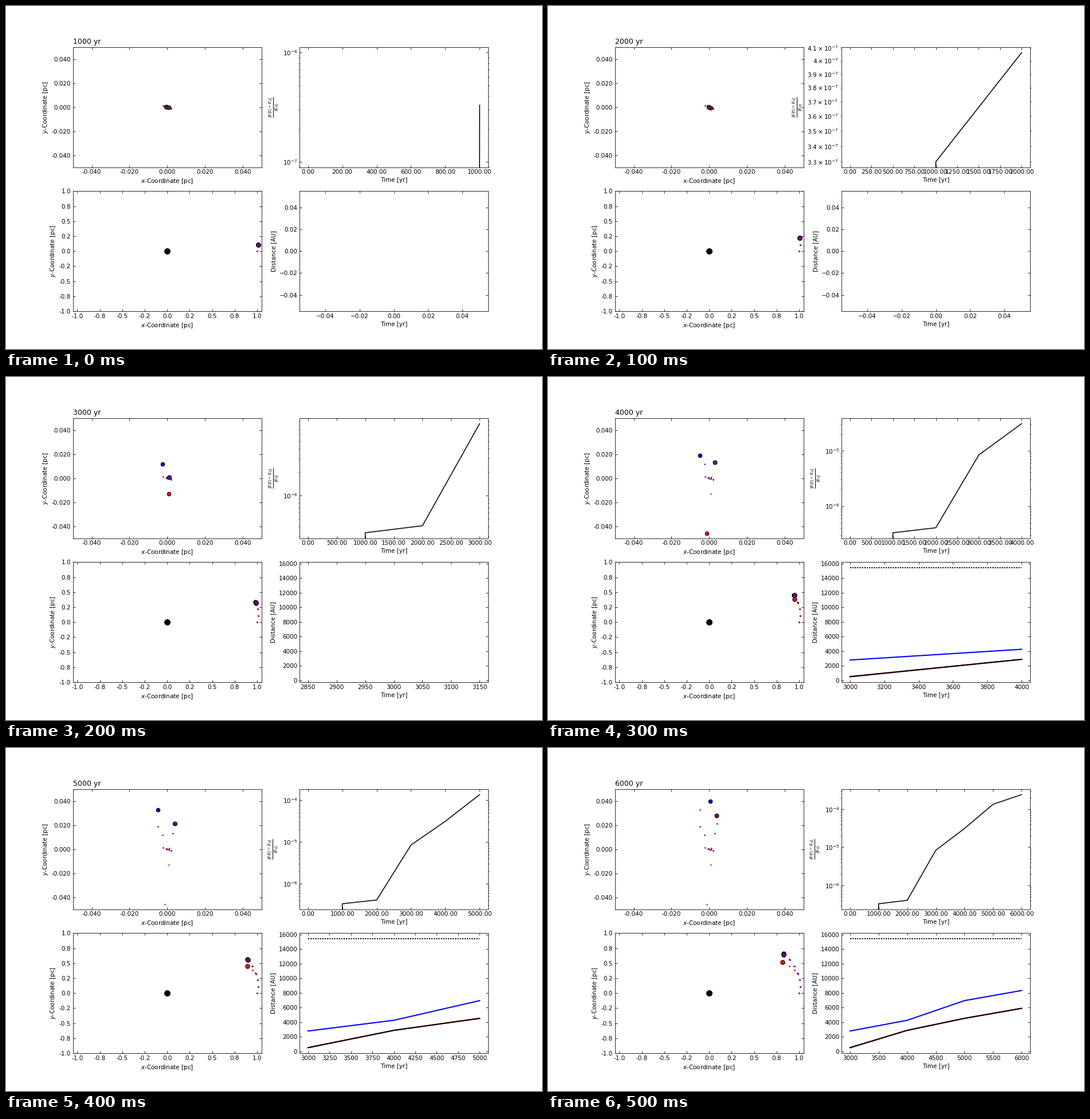
These frames come from a looping animation (935 by 599 pixels, 600 ms). A matplotlib script:

```python
import numpy as np
import matplotlib.pyplot as plt
from matplotlib.animation import FuncAnimation
from matplotlib.ticker import FormatStrFormatter

DPI = 74.8
STEP = 1000            # years per frame
BREAKUP = 3            # first snapshot after the cluster falls apart
AU_PER_PC = 206265
TIDAL_RADIUS = 15450   # AU

plt.rcParams.update({
    "font.family": "DejaVu Sans",
    "xtick.direction": "in", "ytick.direction": "in",
    "xtick.top": True, "ytick.right": True,
})

t = np.arange(7)
years = STEP * t


def path(x, y):
    return np.column_stack([x, y])


# Two bound binaries swing past each other; then one star is thrown down
# (red), one up (blue), and a tight pair (orange, purple) drifts away.
start = np.array([.0021, -.0013])
swing_blue = np.outer(np.cos(1.85 * t) * .5 ** t, start)
swing_pair = np.outer(-(-.25) ** t, start)

free = np.clip(t - BREAKUP + 1, 0, None)
far = np.clip(t - BREAKUP, 0, None)
escaped = free > 0
odd = t % 2

blue = swing_blue + path(-.00285 * free + .000047 * free ** 4,
                         .0104 * free - escaped * .0016 * np.cos(np.pi * t))
pair = swing_pair + path(escaped * .0009 + .0028 * far - .0006 * far ** 2,
                         escaped * .0006 + .0128 * far ** .7)
spin = path(.0002 * odd, 0 * t)
PARTICLES = {
    "red": -(blue + 2 * pair),
    "blue": blue,
    "orange": pair - spin,
    "purple": pair + spin,
}

# Path of the cluster around the central black hole.
angle = .1072 * t
radius = 1 + .042 * np.sin(np.pi * t / 8)
CENTRE = path(radius * np.cos(angle), radius * np.sin(angle))

energy_error = np.array([0, 3.3e-7, 4.062e-7, 8.4e-6, 3.11e-5, 1.35e-4, 2.42e-4])

fig, axes = plt.subplots(2, 2, figsize=(935.001 / DPI, 599.001 / DPI), dpi=DPI)
fig.subplots_adjust(left=.1247, right=.8997)
(ax_local, ax_energy), (ax_orbit, ax_dist) = axes


def draw_particles(ax, now, origin, size, fmt, trail_alpha):
    for color, track in PARTICLES.items():
        x, y = (track + origin)[:now].T
        ax.scatter(x, y, s=3, color=color, alpha=trail_alpha)
    for color, track in PARTICLES.items():
        x, y = (track + origin)[now]
        ax.scatter(x, y, s=size, color=color, edgecolors="black")
    ax.set_xlabel(r"$x$-Coordinate [pc]")
    ax.set_ylabel(r"$y$-Coordinate [pc]")
    ax.xaxis.set_major_formatter(FormatStrFormatter(fmt))
    ax.yaxis.set_major_formatter(FormatStrFormatter(fmt))


def draw_energy(ax, now):
    ax.semilogy(years[:now + 1], energy_error[:now + 1], color="black")
    ax.tick_params(which="minor", direction="out")
    ax.xaxis.set_major_formatter(FormatStrFormatter("%.2f"))
    ax.set_xlabel("Time [yr]")
    ax.set_ylabel(r"$\frac{|E(t)-E_0|}{|E_0|}$")


def draw_distances(ax, now):
    shown = slice(BREAKUP, now + 1)
    time = years[shown]

    def draw_track(name, depth, color):
        x, y = PARTICLES[name][shown].T
        ax.plot(time, AU_PER_PC * np.sqrt(x**2 + y**2 + depth**2), color=color, lw=2)

    draw_track("blue", .0058, "blue")
    draw_track("orange", .0021, "red")
    draw_track("purple", .0021, "black")
    ax.plot(time, np.full(len(time), TIDAL_RADIUS), color="black", lw=2, ls=(0, (1, .99)))
    ax.set_xlabel("Time [yr]")
    ax.set_ylabel("Distance [AU]")


def update(frame):
    now = frame + 1
    for ax in axes.flat:
        ax.clear()

    draw_particles(ax_local, now, 0, 40, "%.3f", .7)
    ax_local.set(xlim=(-.05, .05), ylim=(-.05, .05))
    ax_local.set_title(f"{years[now]} yr", loc="left")

    ax_orbit.scatter(0, 0, s=90, color="black")
    draw_particles(ax_orbit, now, CENTRE, 50, "%.1f", 1)
    ax_orbit.set(xlim=(-1.05, 1.05), ylim=(-1, 1))

    draw_energy(ax_energy, now)
    draw_distances(ax_dist, now)


anim = FuncAnimation(fig, update, frames=6, interval=100, repeat=True,
                     init_func=lambda: update(0))
plt.show()
```
